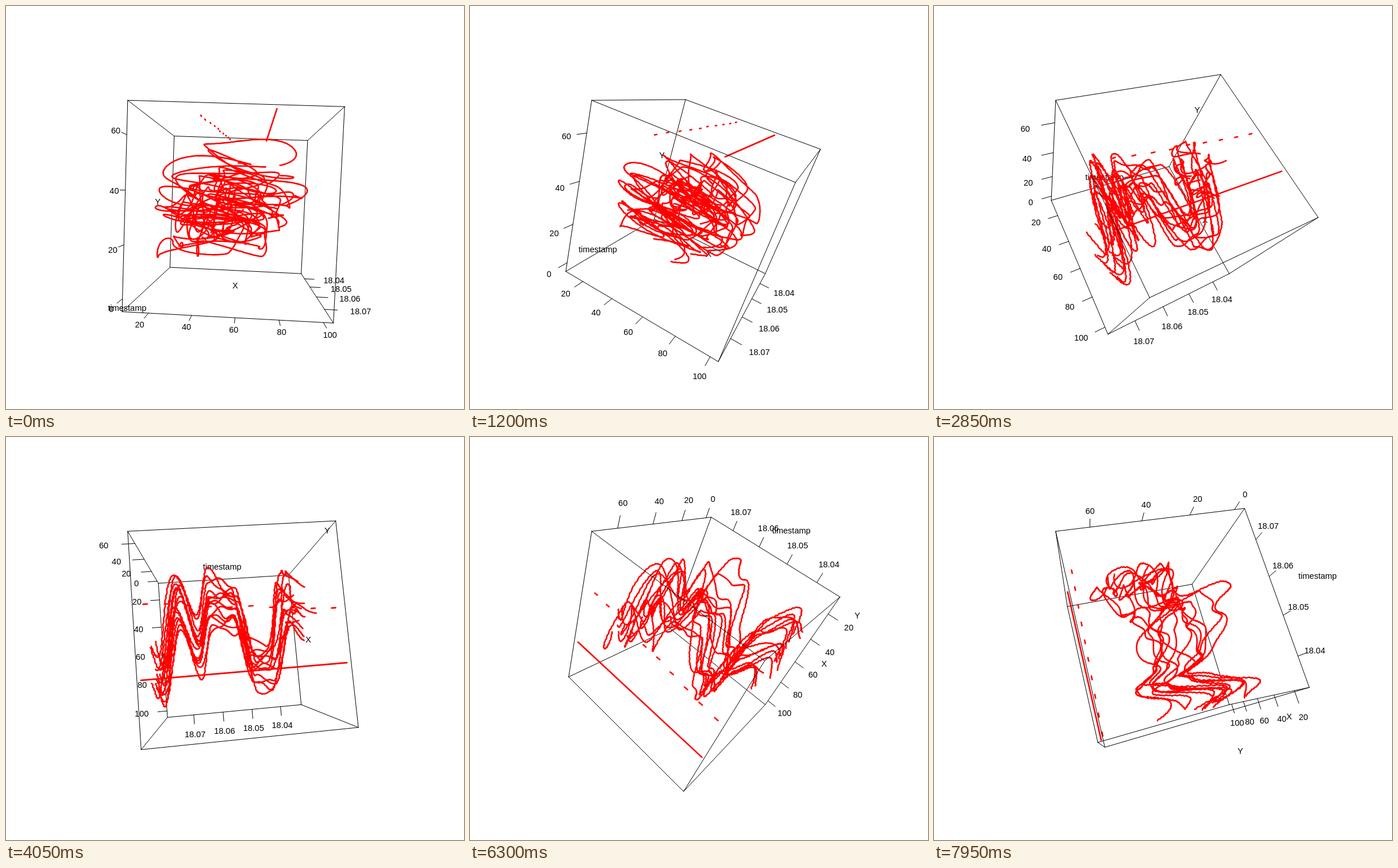
An HTML page with a canvas that plays this animation: 797x702 px, repeating every 8000 ms.

```html
<!DOCTYPE html>
<html lang="en">
<head>
<meta charset="utf-8">
<title>Rotating trajectories</title>
<style>
  html, body { margin: 0; width: 100%; height: 100%; overflow: hidden; background: #fff; }
  canvas { display: block; width: 797px; height: 702px; }
</style>
</head>
<body>
<canvas id="plot" width="797" height="702"></canvas>
<script>
const ctx = document.getElementById('plot').getContext('2d');
const LOOP = 8000, STEP = 150;
const CX = 398.5, CY = 351, FOCAL = 602, DIST = 4.2237;
const TICK = 2 / 15, TITLE = -1.3;
const PLAYERS = 14, MARKS = 10;
const CLOCK = 0.013; // coarse time grid that gives the stepped lines

// A tick of value v sits at first + (v - labels[0]) * scale
const axes = [
  { labels: [20, 40, 60, 80, 100], first: -0.745, scale: 0.02065 },
  { labels: [0, 20, 40, 60], first: -0.875, scale: 0.02593 },
  { labels: ['18.04', '18.05', '18.06', '18.07'], first: -0.682, scale: 43.3 }
];

// Turning points [time, place] of the group as a whole
const driftX = [
  [-1, -.3], [-.75, -.48], [-.62, -.38], [-.42, .4], [-.22, .38], [-.03, -.42],
  [.27, -.52], [.45, .02], [.64, -.48], [.88, .48], [1, .2]
];
const driftY = [[-1, -.1], [-.8, -.35], [-.6, .12], [-.3, -.25], [0, 0], [.2, -.08], [.88, .18], [1, .15]];

let seed = 29;
function rand() {
  seed = (seed * 16807) % 2147483647;
  return seed / 2147483647;
}

function follow(keys, t) {
  const i = Math.max(1, keys.findIndex(k => k[0] >= t));
  const [t0, a] = keys[i - 1], [t1, b] = keys[i];
  return a + (b - a) * (1 - Math.cos(Math.PI * (t - t0) / (t1 - t0))) / 2;
}

// Sum of three waves: slow drift, loops and a faint tremble
function wander(size) {
  const waves = [[5, size], [12, size * 0.5], [26, size * 0.2]]
    .map(([f, amp]) => [f * (0.8 + 0.5 * rand()), amp, rand() * 6.283]);
  return t => waves.reduce((sum, [f, amp, phase]) => sum + amp * Math.sin(f * t + phase), 0);
}

const spread = k => ((k % PLAYERS) + 0.5) / PLAYERS * 2 - 1;

function makePath(k) {
  const homeX = spread(k) * 0.33, homeY = spread(k * 5) * 0.38;
  const moveX = wander(0.11), moveY = wander(0.15);
  const start = -0.95 + rand() * 0.08, end = 0.97 - rand() * 0.06;
  const path = [];
  for (let t = start; t < end; t += 0.005)
    path.push([
      follow(driftX, t) + homeX + moveX(t),
      follow(driftY, t) + homeY + moveY(t),
      Math.round(t / CLOCK) * CLOCK
    ]);
  return path;
}

const paths = Array.from({ length: PLAYERS }, (_, k) => makePath(k));
paths.push([[.39, .97, -.97], [.39, .97, .97]]);
for (let i = 0; i < MARKS; i++) {
  const x = -0.34 + 0.02 * i + 0.03 * rand(), y = 0.9 + 0.007 * i, t = 0.9 - 0.2 * i;
  paths.push([[x, y, t - 0.02], [x, y, t + 0.02]]);
}

// Every box edge as a pair of corners
const edges = [];
for (let d = 0; d < 3; d++)
  for (const p of [-1, 1])
    for (const q of [-1, 1]) {
      const a = [p, p, p];
      a[(d + 1) % 3] = q;
      a[d] = -1;
      const b = a.slice();
      b[d] = 1;
      edges.push([a, b]);
    }

let basis;

// Turn about the diagonal (-1, 1, 1), clockwise as seen by the viewer
function setBasis(angle) {
  const c = Math.cos(angle), s = Math.sin(angle) / Math.sqrt(3);
  const p = (1 + 2 * c) / 3, q = (1 - c) / 3;
  basis = [
    [p, -q - s, -q + s],
    [-q + s, p, q + s],
    [-q - s, q - s, p]
  ];
}

const turn = v => [0, 1, 2].map(i => v[0] * basis[0][i] + v[1] * basis[1][i] + v[2] * basis[2][i]);

function project(v) {
  const [x, y, z] = turn(v);
  const k = FOCAL / (DIST - z);
  return [CX + x * k, CY - y * k];
}

function strokeAll(lines, color, width) {
  ctx.beginPath();
  for (const line of lines)
    line.forEach((v, i) => ctx[i ? 'lineTo' : 'moveTo'](...project(v)));
  ctx.strokeStyle = color;
  ctx.lineWidth = width;
  ctx.stroke();
}

function label(text, v, lean = 0) {
  const [x, y] = project(v);
  ctx.fillText(text, x + lean * ctx.measureText(text).width / 2, y + 6.5);
}

function drawAxis(d, home, outAxis, outSign) {
  const { labels, first, scale } = axes[d];
  const dx = basis[outAxis][0] * outSign;
  const lean = Math.sign(dx) * Math.min(1, Math.max(0, (Math.abs(dx) - 0.65) / 0.35));
  const ticks = labels.map(text => {
    const at = home.slice();
    at[d] = first + (text - labels[0]) * scale;
    const out = n => at.map((c, i) => i === outAxis ? c + outSign * TICK * n : c);
    label(text, out(2), lean);
    return [at, out(1)];
  });
  strokeAll(ticks, '#000', 1);
}

function draw(step) {
  setBasis((step + 1) * 4 * Math.PI / 180);
  ctx.fillStyle = '#fff';
  ctx.fillRect(0, 0, 797, 702);
  ctx.fillStyle = '#000';
  ctx.font = '14.5px "Liberation Sans", Arial, sans-serif';
  ctx.textAlign = 'center';
  ctx.lineJoin = ctx.lineCap = 'round';

  const isNear = ([a, b]) => turn(a)[2] + turn(b)[2] > 0.6;
  strokeAll(edges.filter(e => !isNear(e)), '#000', 1);

  label('X', [0, TITLE, TITLE]);
  label('Y', [TITLE, 0, TITLE]);
  label('timestamp', [TITLE, TITLE, 0]);

  // Scales sit on the edges between a facing and a hidden side
  if (step < 29) {
    drawAxis(0, [0, -1, 1], 2, 1);
    drawAxis(1, [-1, 0, 1], 2, 1);
    drawAxis(2, [1, -1, 0], 0, 1);
  } else {
    drawAxis(0, [0, -1, -1], 2, -1);
    drawAxis(1, [-1, 0, 1], 0, -1);
    drawAxis(2, [-1, -1, 0], 0, -1);
  }

  strokeAll(paths, '#f00', 2.6);
  strokeAll(edges.filter(isNear), '#000', 1);
}

let shown = -1;
function tick() {
  const step = Math.floor((performance.now() % LOOP) / STEP);
  if (step !== shown) draw(shown = step);
  requestAnimationFrame(tick);
}
tick();
</script>
</body>
</html>
```
